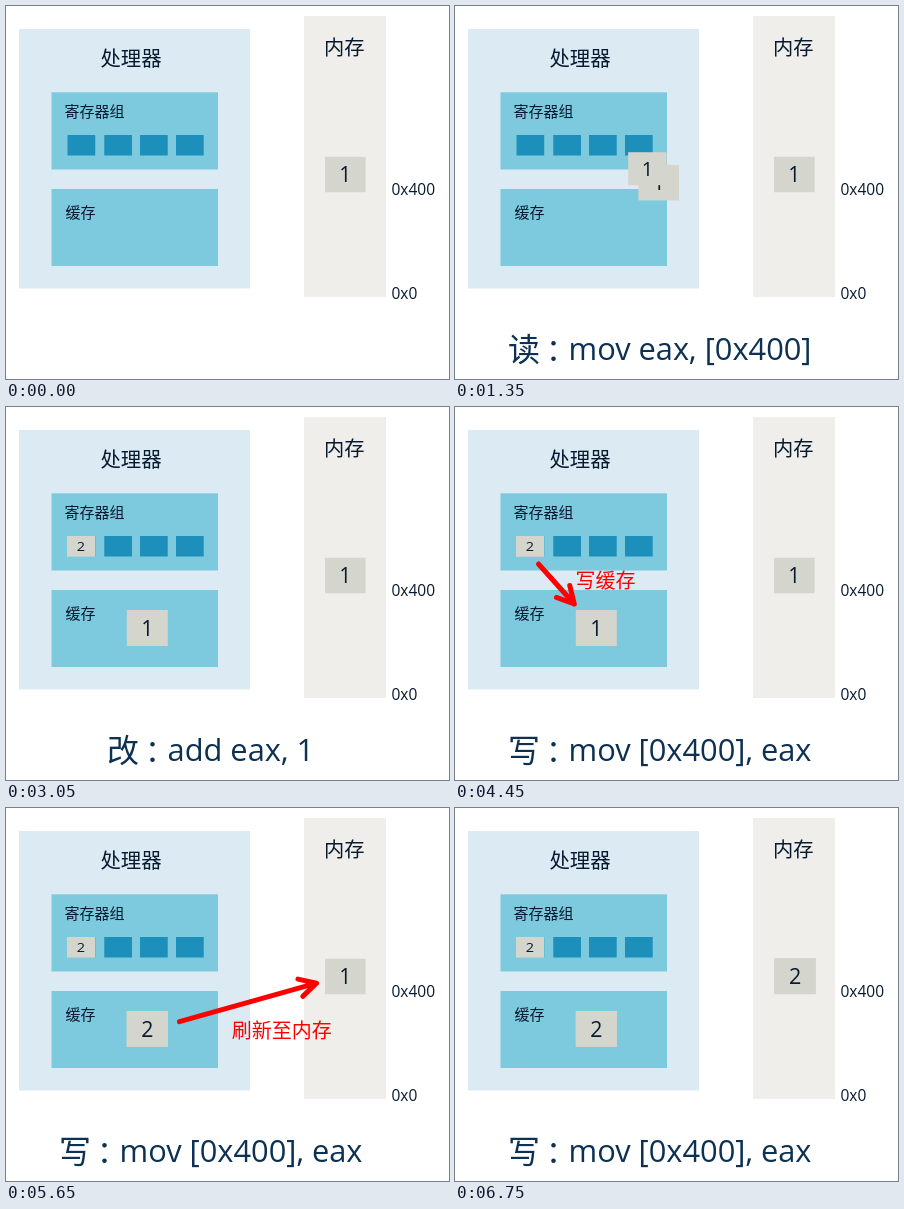
An HTML page with a canvas that plays this animation: 443 px wide and 373 px high, repeating every 7 s.

```html
<!DOCTYPE html>
<html lang="zh-CN">
<head>
<meta charset="utf-8">
<style>
html, body { margin: 0; width: 100%; height: 100%; overflow: hidden; background: #fff; }
canvas { display: block; width: 443px; height: 373px; }
</style>
</head>
<body>
<canvas id="stage" width="443" height="373"></canvas>
<script>
const ctx = document.getElementById('stage').getContext('2d');
const LOOP = 7000, STEP = 50;
const CJK = '"Noto Sans CJK SC", "Noto Sans CJK JP", "Noto Sans CJK", sans-serif';
const LATIN = '"Open Sans", "Noto Sans", sans-serif';
const INK = '#081a30', CODE_INK = '#0c3152', RED = '#ff0000';

// Chip poses: centre and size
const MEM = { x: 339.3, y: 168.5, w: 40.5, h: 35.5 };
const MEM_NEW = { x: 340.2, y: 168, w: 41.5, h: 36 };
const FORK = { x: 216.5, y: 167.5, w: 40.5, h: 35.5 };
const CACHE = { x: 141.3, y: 221, w: 41, h: 36 };
const REG = { x: 75, y: 139.3, w: 28, h: 20.5 };
const FORK_AT = 0.566;

const clamp = v => Math.min(1, Math.max(0, v));
const easeOut = v => 1 - (1 - v) ** 2;
const progress = (t, start, length) => easeOut(clamp((t - start) / length));

function mix(a, b, p) {
  const pose = {};
  for (const k in a) pose[k] = a[k] + (b[k] - a[k]) * p;
  return pose;
}

function box(x1, y1, x2, y2, color) {
  ctx.fillStyle = color;
  ctx.fillRect(x1, y1, x2 - x1, y2 - y1);
}

function text(str, x, y, size, color = INK, family = CJK, weight = 500) {
  ctx.font = `${weight} ${size}px ${family}`;
  ctx.fillStyle = color;
  ctx.textAlign = 'left';
  ctx.fillText(str, x, y);
}

function chip(pose, digit, alpha = 1) {
  ctx.save();
  ctx.globalAlpha = alpha;
  ctx.translate(pose.x, pose.y);
  ctx.scale(pose.w / 40.5, pose.h / 35.5);
  box(-20.25, -17.75, 20.25, 17.75, '#d4d5cd');
  ctx.font = `500 21px ${LATIN}`;
  ctx.fillStyle = INK;
  ctx.textAlign = 'center';
  ctx.fillText(digit, 0, 7.5);
  ctx.restore();
}

function arrow(x1, y1, x2, y2) {
  const back = Math.atan2(y1 - y2, x1 - x2);
  const barb = a => [x2 + 19 * Math.cos(back + a), y2 + 19 * Math.sin(back + a)];
  ctx.strokeStyle = RED;
  ctx.lineWidth = 5;
  ctx.lineCap = ctx.lineJoin = 'round';
  ctx.beginPath();
  ctx.moveTo(x1, y1);
  ctx.lineTo(x2, y2);
  ctx.moveTo(...barb(0.49));
  ctx.lineTo(x2, y2);
  ctx.lineTo(...barb(-0.49));
  ctx.stroke();
}

function caption(word, code, x) {
  text(word, x, 354.5, 32, CODE_INK, CJK, 400);
  text('：', x + 38, 353.5, 30, CODE_INK, CJK, 300);
  text(code, x + 60.5, 354, 30.8, CODE_INK, LATIN, 400);
}

function scene() {
  box(0, 0, 443, 373, '#ffffff');
  box(13, 23, 244, 282.5, '#dcebf3');
  box(45.5, 86.3, 212, 163.5, '#7dcade');
  box(45.5, 183, 212, 260, '#7dcade');
  for (const x of [61.5, 98.3, 134, 170]) box(x, 129, x + 27.7, 149.5, '#1d8fbb');
  box(298, 10, 380, 291, '#efeeea');
  text('处理器', 94.4, 59.5, 20.4);
  text('寄存器组', 58.6, 111, 15);
  text('缓存', 59.6, 211.8, 15);
  text('内存', 318, 49, 20.3);
  text('0x400', 385.5, 188.5, 15.5, INK, LATIN);
  text('0x0', 385.5, 293, 15.5, INK, LATIN);
}

// Both copies share the way to the fork, then part
function readPose(p, goal) {
  return p < FORK_AT ? mix(MEM, FORK, p / FORK_AT)
                     : mix(FORK, goal, (p - FORK_AT) / (1 - FORK_AT));
}

function draw(t) {
  scene();
  chip(MEM, '1');
  if (t < 950) return;

  if (t < 2750) caption('读', 'mov eax, [0x400]', 53);
  else if (t < 4450) caption('改', 'add eax, 1', 101);
  else caption('写', 'mov [0x400], eax', 53);

  const read = progress(t, 950, 1000);
  chip(readPose(read, CACHE), '1');
  chip(readPose(read, REG), '1');

  if (t >= 2750) chip(REG, '2', clamp((t - 2750) / 300));

  if (t >= 4450 && t < 5650) {
    arrow(83.5, 157, 119.3, 197);
    text('写缓存', 120.4, 181.3, 20, RED, CJK, 400);
  }
  if (t >= 5650 && t < 6750) {
    arrow(173.5, 213.7, 310.5, 175.2);
    text('刷新至内存', 225.8, 230.3, 20, RED, CJK, 400);
  }
  if (t >= 4450) chip(mix(REG, CACHE, progress(t, 4450, 700)), '2');
  if (t >= 5650) chip(mix(CACHE, MEM_NEW, progress(t, 5650, 700)), '2');
}

const begin = performance.now();
function tick() {
  const t = (performance.now() - begin) % LOOP;
  draw(Math.floor(t / STEP) * STEP);
  requestAnimationFrame(tick);
}
tick();
</script>
</body>
</html>
```
